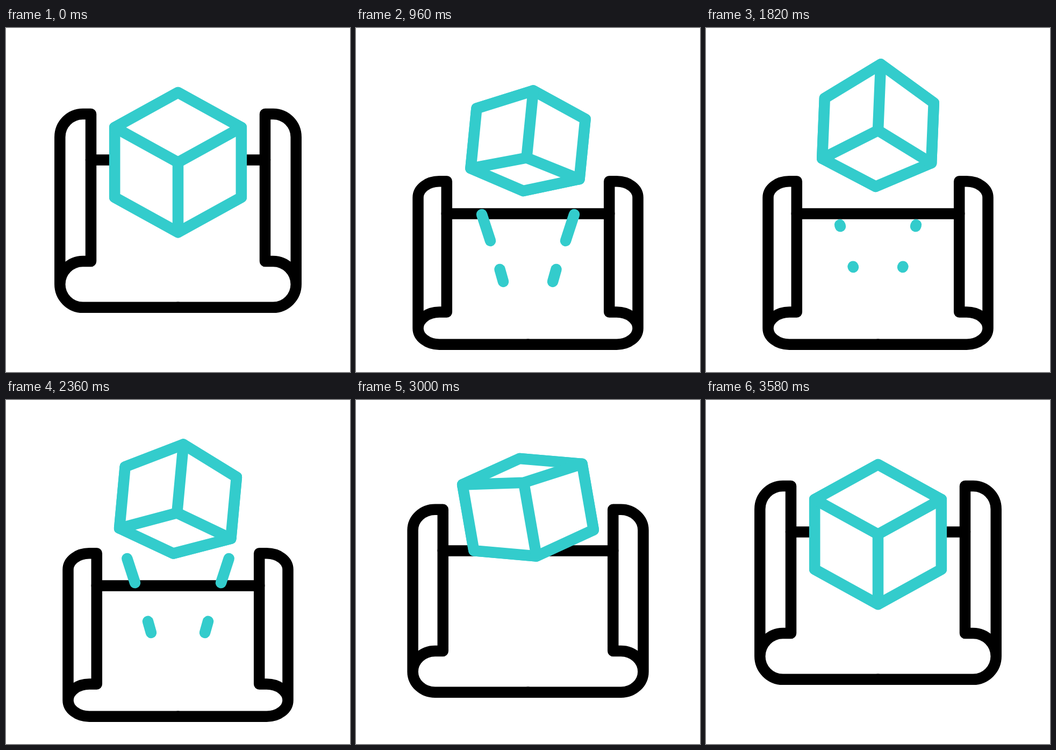
These frames come from a looping animation (640x640 px, 3600 ms). An HTML page with a canvas:

```html
<!DOCTYPE html>
<html lang="en">
<head>
<meta charset="utf-8">
<title>Cube over a scroll</title>
<style>
  html, body { margin: 0; height: 100%; overflow: hidden; background: #fff; }
  canvas { display: block; width: 100vw; height: 100vh; }
</style>
</head>
<body>
<canvas id="stage" width="640" height="640"></canvas>
<script>
const ctx = document.getElementById('stage').getContext('2d');
const LOOP = 3600, TEAL = '#33cccc', PI = Math.PI;

const mix = (a, b, p) => a + (b - a) * p;
const progress = (t, from, to) => Math.min(1, Math.max(0, (t - from) / (to - from)));
const ease = (t, from, to) => {
  const p = progress(t, from, to);
  return p * p * (3 - 2 * p);
};

const unroll = t => ease(t, 200, 600) - ease(t, 2700, 3200);
const settle = t => ease(t, 1950, LOOP);

// Rocks from side to side, easing to rest at each turn.
function sway(t) {
  const turns = [200, 750, 1450, 2090, 2950, LOOP];
  let angle = 0;
  for (let i = 0; i < 5; i++) {
    const swing = i % 4 ? 20 : 10;
    angle += (i % 2 ? -swing : swing) * ease(t, turns[i], turns[i + 1]);
  }
  return angle * PI / 180;
}

function line(points, closed) {
  ctx.beginPath();
  points.forEach(p => ctx.lineTo(...p));
  if (closed) ctx.closePath();
  ctx.stroke();
}

// Runs a drawing once as it is and once mirrored about the middle.
function both(draw) {
  draw();
  ctx.save();
  ctx.translate(640, 0);
  ctx.scale(-1, 1);
  draw();
  ctx.restore();
}

function drawScroll(t) {
  const u = unroll(t);
  const outer = mix(100.3, 115.5, u), inner = mix(158, 168.8, u), bend = mix(143, 155, u);
  const top = mix(160, 285.3, u), bottom = mix(519.8, 588.7, u), curl = mix(434, 528.5, u);
  const bar = mix(245.5, 345.5, u), ry = mix(43, 30, u), rx = bend - outer;
  ctx.strokeStyle = '#000';
  line([[inner, bar], [640 - inner, bar]]);
  both(() => {
    ctx.beginPath();
    ctx.moveTo(321, bottom);
    ctx.ellipse(bend, bottom - ry, rx, ry, 0, PI / 2, PI);
    ctx.ellipse(bend, top + ry, rx, ry, 0, PI, PI * 1.5);
    ctx.lineTo(inner, top);
    ctx.lineTo(inner, curl);
    ctx.ellipse(bend, curl + ry, rx, ry, 0, -PI / 2, -PI, true);
    ctx.stroke();
  });
}

function drawBeams(t) {
  const length = ease(t, 600, 900) - .94 * ease(t, 1300, 1820)
    + .86 * ease(t, 1820, 2360) - .92 * ease(t, 2360, 2750);
  if (length < .001) return;
  const rise = 39 * ease(t, 920, 2350), spread = ease(t, 1820, 2360);
  const dash = (x, y, dx, dy) => line([[x, y], [x + dx * length, y + dy * length]]);
  ctx.strokeStyle = TEAL;
  both(() => {
    dash(250 - 10 * spread, 396 - rise - 17 * spread, -16, -49);
    dash(274 - 4 * spread, 472 - rise, -6.5, -23);
  });
}

function drawCube(t) {
  const tip = 1 - (1 - progress(t, 200, 1300)) ** 1.3;
  const m = mix(65, -72, tip - settle(t));
  const size = 1 - .138 * (ease(t, 200, 590) - settle(t));
  const middle = 250 + 4 * unroll(t) - 63 * (ease(t, 500, 1300) - ease(t, 2800, 3550));
  const c = Math.cos(sway(t)) * size, s = Math.sin(sway(t)) * size;
  const at = (x, y) => [320 + x * c - y * s, middle + x * s + y * c];

  // m is the middle of the front edge: positive when the cube is seen from above.
  const above = m > 0;
  const half = (147 - (above ? .004 : .0008) * m * m) / 2;
  const back = 76 + (above ? .83 : .62) * Math.abs(m);
  const frontTop = at(0, m - half), frontLow = at(0, m + half);
  const left = at(-117.8, -65), right = at(117.8, -65);
  const leftLow = at(-117.8, 65), rightLow = at(117.8, 65);
  ctx.strokeStyle = TEAL;
  ctx.fillStyle = '#fff';
  line([left, above ? at(0, -back) : frontTop, right,
    rightLow, above ? frontLow : at(0, back), leftLow], true);
  ctx.fill();
  ctx.stroke();
  line(above ? [left, frontTop, right] : [leftLow, frontLow, rightLow]);
  line([frontTop, frontLow]);
}

function frame() {
  const t = performance.now() % LOOP;
  ctx.fillStyle = '#fff';
  ctx.fillRect(0, 0, 640, 640);
  ctx.lineWidth = 20.5;
  ctx.lineCap = ctx.lineJoin = 'round';
  drawScroll(t);
  drawBeams(t);
  drawCube(t);
  requestAnimationFrame(frame);
}
frame();
</script>
</body>
</html>
```
